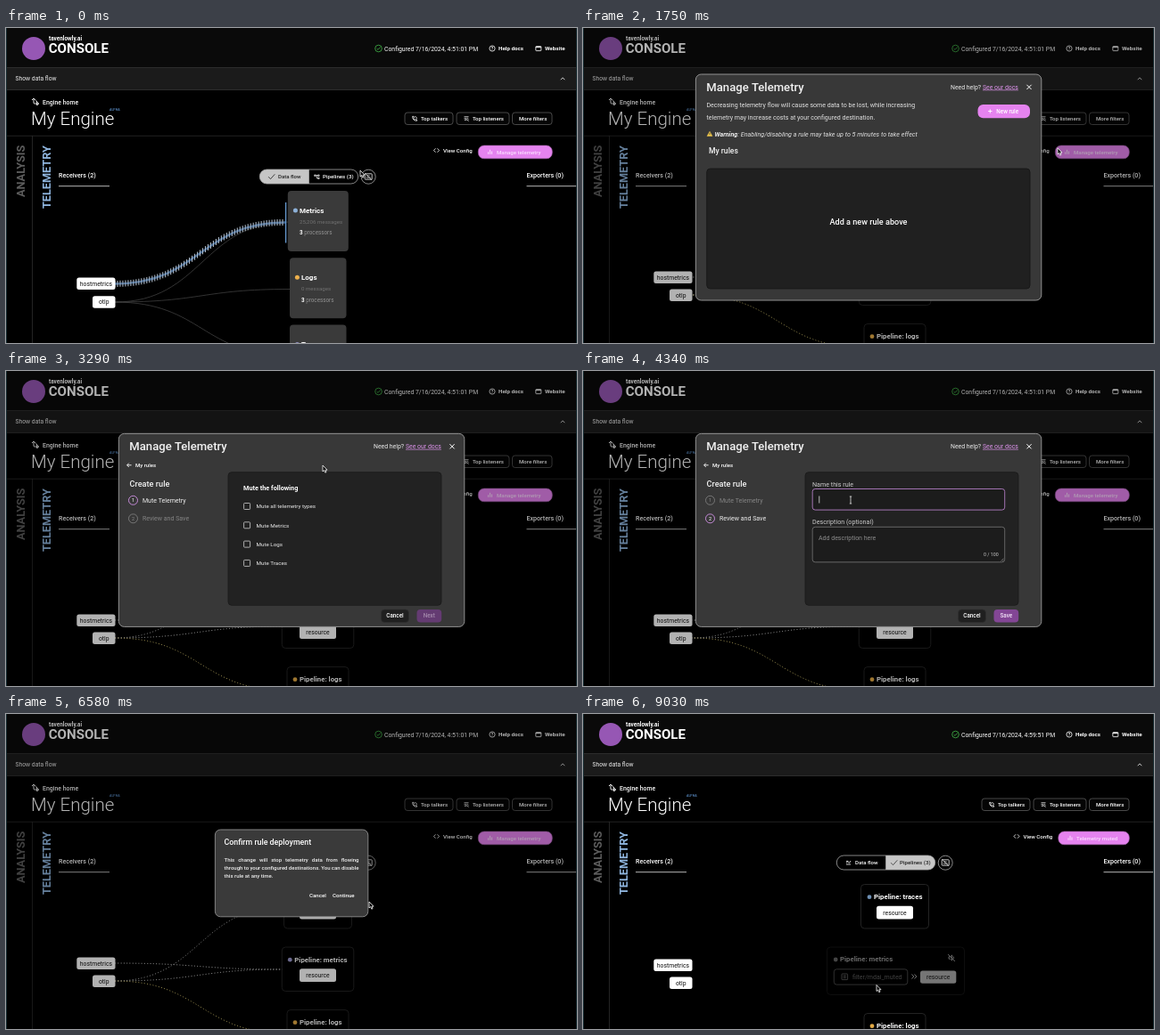
These frames come from a looping animation (640 by 354 pixels, 9100 ms). An HTML page with a canvas:

```html
<!DOCTYPE html>
<html lang="en">
<head>
<meta charset="utf-8">
<title>Console</title>
<style>
  html, body { margin: 0; width: 100%; height: 100%; overflow: hidden; background: #000; }
  canvas { display: block; width: 640px; height: 354px; }
</style>
</head>
<body>
<canvas id="stage"></canvas>
<script>
const W = 640, H = 354, LOOP = 9100, STEP = 70;
const PINK = '#e583ef', LINE = '#2c2c2c', PANEL = '#383838';
const canvas = document.getElementById('stage');
const ctx = canvas.getContext('2d');
const ratio = window.devicePixelRatio || 1;
canvas.width = W * ratio;
canvas.height = H * ratio;

// Moments at which the screen changes
const AT = { pipelines: 490, links: 1330, rules: 1470, create: 2730, check: 3640, review: 4060,
             type: 4410, typed: 4900, confirm: 5950, close: 7000, muted: 7910 };

// Pointer stops: time, x, y, shape
const STOPS = [
  [0, 397, 160, 'arrow'], [280, 375, 166, 'hand'], [490, 375, 166, 'arrow'],
  [980, 549, 147, 'arrow'], [1190, 570, 137, 'hand'], [1540, 570, 137, 'arrow'],
  [2240, 394, 127, 'arrow'], [2590, 471, 92, 'hand'], [2730, 471, 92, 'arrow'],
  [3290, 355, 106, 'arrow'], [3570, 270, 172, 'hand'], [3710, 270, 172, 'arrow'],
  [3990, 474, 274, 'hand'], [4130, 474, 274, 'arrow'], [4340, 300, 145, 'bar'],
  [4900, 300, 145, 'arrow'], [5250, 474, 274, 'hand'], [5950, 474, 274, 'arrow'],
  [6580, 407, 211, 'arrow'], [6790, 378, 202, 'hand'], [7000, 378, 202, 'arrow'],
  [7910, 378, 202, 'arrow'], [8400, 452, 205, 'arrow'], [8540, 452, 205, 'arrow'],
  [9030, 329, 304.5, 'arrow'], [9100, 329, 304.5, 'arrow']
];

function text(s, x, y, size, color = '#fff', weight = 400, align = 'left') {
  ctx.font = `${weight} ${size}px Roboto, sans-serif`;
  ctx.fillStyle = color;
  ctx.textAlign = align;
  ctx.fillText(s, x, y);
  return ctx.measureText(s).width;
}

function box(x, y, w, h, r, fill, stroke, width = 0.8) {
  ctx.beginPath();
  ctx.roundRect(x, y, w, h, r);
  if (fill) { ctx.fillStyle = fill; ctx.fill(); }
  if (stroke) { ctx.strokeStyle = stroke; ctx.lineWidth = width; ctx.stroke(); }
}

function dot(x, y, r, fill, stroke, width = 0.8) {
  box(x - r, y - r, 2 * r, 2 * r, r, fill, stroke, width);
}

function path(d, x, y, color = '#fff', width = 0.8, fill) {
  const p = new Path2D(d);
  ctx.save();
  ctx.translate(x, y);
  if (fill) { ctx.fillStyle = fill; ctx.fill(p); }
  ctx.strokeStyle = color;
  ctx.lineWidth = width;
  ctx.stroke(p);
  ctx.restore();
}

function rule(x1, y1, x2, y2, color, width = 1) {
  path(`M${x1} ${y1}L${x2} ${y2}`, 0, 0, color, width);
}

function link(x1, y1, x2, y2, color, width, dash = [], offset = 0) {
  const m = (x1 + x2) / 2;
  ctx.setLineDash(dash);
  ctx.lineDashOffset = -offset;
  path(`M${x1} ${y1}C${m} ${y1} ${m} ${y2} ${x2} ${y2}`, 0, 0, color, width);
  ctx.setLineDash([]);
}

// Upright ticks along the same curve as link()
function ticks(x1, y1, x2, y2, gap, shift) {
  const count = Math.round((x2 - x1) / gap);
  for (let i = 0; i < count; i++) {
    const want = (i + shift % 1) / count;
    let lo = 0, hi = 1, u = 0.5;
    for (let k = 0; k < 12; k++) {
      u = (lo + hi) / 2;
      const x = 1.5 * u * (1 - u) + u * u * u;
      if (x < want) lo = u; else hi = u;
    }
    const x = x1 + (x2 - x1) * want, y = y1 + (y2 - y1) * u * u * (3 - 2 * u);
    rule(x, y - 3.6, x, y + 3.4, '#aab6c4', 1.1);
  }
}

function pill(s, x, y, w, h, fill = '#fff', color = '#111') {
  box(x, y, w, h, 2.5, fill);
  text(s, x + w / 2, y + h / 2 + 2.4, 6.8, color, 400, 'center');
}

const phone = 'M-2.4 -2.4L-1 -2.4L-.5 -.8L-1.2 -.2Q-.6 .9 .4 1.4L1 .7L2.5 1.2L2.5 2.5Q-2.2 2.4 -2.4 -2.4M.3 -2.4Q2.3 -2 2.5 0';
const bars = 'M-2 2.5V0M0 2.5V-2.5M2 2.5V-.8';
const tick = 'M-3.4 .2L-1 2.7L3.8 -2.7';
const nodes = 'M-2.8 -2H-1.4V-.6H-2.8ZM1.2 -2H2.6V-.6H1.2ZM1.2 1.1H2.6V2.5H1.2ZM-1.4 -1.3H1.2M-.2 -1.3V1.8H1.2';

function header(muted) {
  box(0, 0, W, 44.5, 0, '#0a0a0a');
  dot(31, 23, 13, '#9657b4');
  text('tavenlowly.ai', 48, 14, 6.4, '#fff', 700);
  text('CONSOLE', 47.7, 28.3, 15.1, '#fff', 700);
  dot(417.5, 23, 3.8, null, '#43b649');
  path('M-1.8 .1L-.5 1.4L2 -1.4', 417.5, 23, '#43b649');
  text(`Configured 7/16/2024, 4:5${muted ? '9:5' : '1:0'}1 PM`, 424, 25.6, 6.85);
  dot(545, 23, 3.1, null, '#fff');
  text('?', 545, 25, 5, '#fff', 500, 'center');
  text('Help docs', 552, 25.4, 6.25, '#fff', 700);
  box(593.8, 20.6, 6, 5, 0.6, null, '#fff');
  rule(593.8, 21.6, 599.8, 21.6, '#fff', 1);
  text('Website', 604, 25.4, 6.25, '#fff', 700);

  box(0, 44.5, W, 25, 0, '#1b1b1b', '#343434');
  text('Show data flow', 10.5, 59.4, 6.75, '#eee');
  path('M-2.3 1.2L0 -1.2L2.3 1.2', 624, 57, '#ddd', 0.9);

  path('M-2 -3.6V1Q-2 2 -1 2H3.5M-4 -2L-2 -4L0 -2M2 .5L3.8 2L2 3.6M1.6 4V0Q1.6 -1.3 .2 -1.3', 33, 83, '#fff', 0.9);
  text('Engine home', 41, 85.6, 6.9, '#fff', 500);
  text('My Engine', 28, 109, 20.5, '#fff', 300);
  text('ALPHA', 116, 93.4, 3.6, '#5b8fc9', 500);

  [[447, 54, 'Top talkers', 465], [505, 59, 'Top listeners', 523], [567.5, 44.5, 'More filters', 575]]
    .forEach(([x, w, s, tx], i) => {
      box(x, 95, w, 13.5, 3, '#050505', '#666', 0.7);
      text(s, tx, 104, 6.1, '#fff', 500);
      if (i < 2) path(i ? 'M-2.5 -2H2.5M-2.5 0H.5M-2 2L0 1L2.6 2.6M1 -.5L2.5 .8' : phone, x + 11, 101.8, '#fff', 0.8);
    });

  rule(0, 121.2, W, 121.2, LINE, 0.8);
  rule(29.5, 121, 29.5, H, LINE, 0.8);
  [['ANALYSIS', 20.6, 190, '#5c5c5c'], ['TELEMETRY', 50.4, 203, '#8fb5de']].forEach(([s, x, y, c]) => {
    ctx.save();
    ctx.translate(x, y);
    ctx.rotate(-Math.PI / 2);
    text(s, 0, 0, 12.7, c, 700);
    ctx.restore();
  });

  text('Receivers (2)', 59, 168, 7.1, '#fff', 500);
  rule(59, 177.7, 116, 177.7, '#ccc', 0.9);
  text('Exporters (0)', 583.5, 168, 7.1, '#fff', 500);
  rule(583.5, 177.7, W, 177.7, '#ccc', 0.9);

  const dx = muted ? 3.5 : 0;
  path('M-1 -2.2L-3 0L-1 2.2M1 -2.2L3 0L1 2.2', 482.5 + dx, 137.5, '#fff', 0.8);
  text('View Config', 490 + dx, 139.6, 6.1, '#fff', 500);
  box(529.3 + dx, 132, 83 - dx, 14.8, 6.5, PINK, '#9a5fa2', 0.6);
  path(bars, 542.5 + dx, 139.3, '#fbdcff', 1);
  text(muted ? 'Telemetry muted' : 'Manage telemetry', muted ? 553 : 550, 141.6, 6.1, '#fbdcff', 500);
}

function toggle(onPipes) {
  box(284.3, 159, 110.4, 16, 8, '#000');
  ctx.save();
  ctx.beginPath();
  ctx.rect(onPipes ? 339.5 : 284, 158, 55.5, 18);
  ctx.clip();
  box(284.3, 159, 110.4, 16, 8, '#c6c6c6');
  ctx.restore();
  box(284.3, 159, 110.4, 16, 8, null, '#a8a8a8', 0.8);
  rule(339.5, 159, 339.5, 175, '#a8a8a8', 0.8);
  const left = onPipes ? '#fff' : '#222', right = onPipes ? '#222' : '#fff';
  path(onPipes ? 'M-2.5 2H2.5M-2.5 .4Q-1 -2 0 -.2T2.5 -2M-2.5 -1.6H0' : tick, 297.5, 167, left, 0.8);
  path(onPipes ? tick : nodes, 348.5, 167, right, 0.7);
  text('Data flow', 305, 169.3, 6.05, left, 500);
  text('Pipelines (3)', 355, 169.3, 6.15, right, 500);
  dot(406.2, 167.2, 8, '#000', '#aaa', 0.8);
  box(402.2, 163.8, 8, 6.4, 0.6, null, '#ddd', 0.9);
  path('M-4 -4L4 4M-2.5 1.2H2.5M-2 -1H1.5', 406.2, 167, '#ddd', 0.8);
}

function receivers(y1, y2) {
  pill('hostmetrics', 79.3, y1 - 6.7, 43.2, 13.5);
  pill('otlp', 97, y2 - 6.7, 25.5, 13.5);
}

function flowCard(x, y, w, color, name, count, tx) {
  box(x, y, w, 68, 4, '#3a3a3a');
  dot(tx - 4.6, y + 22, 2.5, color);
  text(name, tx, y + 24.7, 8, '#fff', 700);
  text(`${count} messages`, tx, y + 37, 6.15, '#707070');
  const n = text('3', tx, y + 49.2, 6.3, '#fff', 700);
  text(' processors', tx + n, y + 49.2, 6.3, '#909090');
}

function dataFlow(t) {
  [218, 293.5, 368].forEach(y => link(122, 308, 318, y, '#484848', 0.7));
  link(122, 287.5, 313, 218.5, '#3f648f', 2.4);
  ticks(122, 287.5, 313, 218.5, 3, t * 0.006);
  rule(313.6, 196, 313.6, 241.5, '#6596cc', 1.4);
  flowCard(315.8, 183, 68, '#8db1d8', 'Metrics', '25,206', 329);
  flowCard(318, 258.3, 63.5, '#edb04c', 'Logs', '0', 331);
  flowCard(318, 333.5, 63.5, '#8a8ab8', 'Traces', '0', 331);
  receivers(287.3, 308);
}

function pipeCard(x, y, w, color, name, tx) {
  box(x, y, w, 49.5, 4, '#000', LINE, 0.8);
  dot(tx - 5, y + 14.2, 2.4, color);
  text(`Pipeline: ${name}`, tx, y + 16.8, 7.8, '#fff', 700);
  pill('resource', 329, y + 24.3, 41, 14.6);
}

function mutedCard() {
  box(273.5, 262, 154, 53.5, 4, '#000', '#121212', 0.8);
  dot(283.2, 276, 2.4, '#444');
  text('Pipeline: metrics', 288, 278.4, 7.8, '#686868', 700);
  path('M-3 -1.2H-1.4L.6 -3V3L-1.4 1.2H-3ZM2 -1.5Q3 0 2 1.5M-4 -4L4 4', 413, 274, '#888', 0.7);
  box(281.3, 286.8, 82.5, 17.3, 3, '#000', '#3c3c3c', 0.8);
  box(290, 292, 6.6, 6.6, 0.6, null, '#444', 0.8);
  path('M-2 -1H2M-2 1H2M0 -2V2', 293.3, 295.3, '#444', 0.6);
  text('filter/mdai_muted', 302, 297.8, 7, '#414141');
  path('M-2.6 -2.5L-.2 0L-2.6 2.5M.4 -2.5L2.8 0L.4 2.5', 371, 295, '#999', 0.8);
  pill('resource', 378, 288.4, 40.3, 14.4, '#757575', '#111');
}

function pipelines(t, muted) {
  if (t >= AT.links && !muted) {
    const go = t * 0.012, dash = [1.1, 2.2];
    link(122, 280, 310, 287, '#bbb', 1, dash, go);
    link(122, 300, 311, 217, '#aaa', 1, dash, go);
    link(122, 300, 310, 287, '#bbb', 1, dash, go);
    link(122, 300, 315, 359, '#c8b868', 1, dash, go);
  }
  pipeCard(311.5, 191.5, 76, '#6d8fb3', 'traces', 326);
  if (muted) mutedCard();
  else pipeCard(309.3, 262, 80.5, '#9a98cc', 'metrics', 323.3);
  pipeCard(315, muted ? 336.5 : 332.5, 69, '#e3aa45', 'logs', 329);
  receivers(muted ? 282.3 : 280.3, muted ? 302.3 : 300.3);
}

function modal(y, h) {
  box(126.4, y, 387.4, h, 6, PANEL, '#919191', 1);
  text('Manage Telemetry', 138.3, y + 18.8, 13.1, '#f2f2f2', 500);
  text('Need help?', 412, y + 16.6, 6.9, '#eee');
  const w = text('See our docs', 448, y + 16.6, 6.9, '#dc92ea');
  rule(448, y + 17.8, 448 + w, y + 17.8, '#dc92ea', 0.7);
  path('M-2.6 -2.6L2.6 2.6M2.6 -2.6L-2.6 2.6', 500, y + 14.4, '#fff', 1);
}

function rulesModal() {
  modal(52, 254);
  text('Decreasing telemetry flow will cause some data to be lost, while increasing', 138.5, 89, 7.05, '#e2e2e2');
  text('telemetry may increase costs at your configured destination.', 138.5, 102.6, 7.05, '#e2e2e2');
  path('M0 -2.8L3 2.5H-3Z', 142, 119, '#f2c94c', 0.4, '#f2c94c');
  rule(142, 117.8, 142, 120, '#333', 0.7);
  const w = text('Warning', 147.5, 121.5, 7.15, '#eee', 'italic 700');
  text(': Enabling/disabling a rule may take up to 5 minutes to take effect', 147.5 + w, 121.5, 7.15, '#e2e2e2', 'italic 400');
  box(442.5, 86, 58.5, 15.2, 6, PINK);
  path('M-2.2 0H2.2M0 -2.2V2.2', 456.3, 93.5, '#fff', 0.9);
  text('New rule', 463.3, 95.8, 6.3, '#fff', 500);
  text('My rules', 141, 141.2, 8.6, '#f2f2f2', 500);
  box(138.7, 158, 362.3, 135, 4, '#202020', '#161616', 0.8);
  text('Add a new rule above', 320, 221.3, 9.1, '#fff', 500, 'center');
}

function wizardStep(n, name, y, on) {
  dot(142.5, y, 5, null, on ? '#c58ad8' : '#777', 1);
  text(n, 142.5, y + 2.1, 5.6, on ? '#fff' : '#888', 400, 'center');
  text(name, 153, y + 2.6, 7, on ? '#f2f2f2' : '#858585');
}

function muteForm(t) {
  text('Mute the following', 266, 134, 7.3, '#fff', 700);
  ['Mute all telemetry types', 'Mute Metrics', 'Mute Logs', 'Mute Traces'].forEach((s, i) => {
    const y = 152 + i * 21.3, on = i === 1 && t >= AT.check;
    box(266.6, y - 3.5, 7, 7, 0.8, on ? '#d184e0' : null, on ? '#d184e0' : '#bbb', 0.9);
    if (on) path('M-2 0L-.6 1.6L2.2 -1.6', 270.1, y, '#222', 1);
    text(s, 280.5, y + 2.2, 6.25, '#eee');
  });
}

function reviewForm(t) {
  const name = 'Mute metrics pipeline';
  const done = Math.max(0, Math.min(1, (t - AT.type) / (AT.typed - AT.type)));
  const typing = t >= AT.type - 140 && done < 1;
  text('Name this rule', 257, 130, 7.15, '#ccc');
  box(257.2, 132.5, 215.5, 23.6, 3, '#1c1c1c', typing ? '#c58ad8' : '#777', 0.8);
  const w = text(name.slice(0, Math.round(done * name.length)), 264, 146.8, 7, '#fff');
  if (typing) rule(264.8 + w, 140.5, 264.8 + w, 148.5, '#fff', 0.7);
  text('Description (optional)', 257, 172.3, 7.15, '#ccc');
  box(257.2, 175.3, 215.5, 39.5, 3, '#1c1c1c', '#777', 0.8);
  text('Add description here', 264, 189.6, 7, '#8c8c8c');
  text('0 / 100', 449, 208, 5.3, '#ccc');
  path('M-3 0L0 -3M-1.3 0L0 -1.3', 471.5, 213.6, '#999', 0.6);
}

function createModal(t) {
  const review = t >= AT.review;
  modal(70.4, 217);
  path('M2.6 0H-2.2M-.2 -2.2L-2.4 0L-.2 2.2', 138, 105.8, '#fff', 0.9);
  text('My rules', 145, 108, 6.05, '#fff', 500);
  text('Create rule', 138.5, 130.4, 9.2, '#f2f2f2', 500);
  wizardStep('1', 'Mute Telemetry', 145.3, !review);
  wizardStep('2', 'Review and Save', 165.8, review);
  box(249, 113.7, 239, 149.6, 4, '#222', '#1a1a1a', 0.8);
  if (review) reviewForm(t); else muteForm(t);
  box(420.5, 268, 31, 14.5, 4, '#202020', '#303030', 0.7);
  text('Cancel', 436, 277.4, 6.3, '#fff', 500, 'center');
  const ready = t >= AT.check;
  box(460.5, 268, 27.7, 14.5, 4, ready ? '#834695' : '#643b72');
  text(review ? 'Save' : 'Next', 474.3, 277.4, 6.3, ready ? '#f4e4f8' : '#a58bad', 500, 'center');
}

function justified(s, x, y, width) {
  const color = '#eee';
  ctx.font = '500 6.05px Roboto, sans-serif';
  const words = s.split(' ');
  const total = words.reduce((sum, word) => sum + ctx.measureText(word).width, 0);
  const gap = (width - total) / (words.length - 1);
  words.forEach(word => { x += text(word, x, y, 6.05, color, 500) + gap; });
}

function confirmDialog() {
  box(234.4, 130, 171.4, 97.8, 6, '#3a3a3a', '#858585', 1);
  text('Confirm rule deployment', 244.5, 147.4, 8.85, '#fff', 500);
  justified('This change will stop telemetry data from flowing', 244.5, 166, 151);
  justified('through to your configured destinations. You can disable', 244.5, 174.8, 151);
  text('this rule at any time.', 244.5, 183.5, 6.05, '#eee', 500);
  text('Cancel', 340, 205.6, 6.15, '#fff', 500);
  text('Continue', 366, 205.6, 6.15, '#fff', 500);
}

function pointer(t) {
  const i = Math.max(1, STOPS.findIndex(s => s[0] > t));
  const [t0, x0, y0, kind] = STOPS[i - 1], [t1, x1, y1] = STOPS[i];
  const p = (t - t0) / (t1 - t0), e = p * p * (3 - 2 * p);
  const x = x0 + (x1 - x0) * e, y = y0 + (y1 - y0) * e;
  if (kind === 'bar') path('M-1.2 -4H1.2M0 -4V4M-1.2 4H1.2', x, y, '#fff', 0.7);
  else if (kind === 'hand') path('M-.8 -1.5Q0 -2.5 .8 -1.5V1.2L3.2 1.8Q4 2.2 3.7 3.6L3 6.6H-1L-3 3.4Q-2.6 2.3 -.8 3.6Z', x, y, '#222', 0.6, '#fff');
  else path('M0 0V7L1.6 5.6L2.8 8.2L4 7.6L2.9 5.2H5Z', x, y, '#fff', 0.8, '#000');
}

function draw(t) {
  ctx.setTransform(ratio, 0, 0, ratio, 0, 0);
  ctx.fillStyle = '#000';
  ctx.fillRect(0, 0, W, H);
  const pipes = t >= AT.pipelines, muted = t >= AT.muted;
  header(muted);
  toggle(pipes);
  if (pipes) pipelines(t, muted); else dataFlow(t);
  if (t >= AT.rules && t < AT.close) {
    ctx.fillStyle = 'rgba(0,0,0,.3)';
    ctx.fillRect(0, 0, W, H);
    if (t < AT.create) rulesModal();
    else if (t < AT.confirm) createModal(t);
    else confirmDialog();
  }
  [0.5, W - 0.5].forEach(x => rule(x, 0, x, H, '#1d3238', 1));
  pointer(t);
}

function play() {
  const t = performance.now() % LOOP;
  draw(Math.floor(t / STEP) * STEP);
  requestAnimationFrame(play);
}
play();
</script>
</body>
</html>
```
